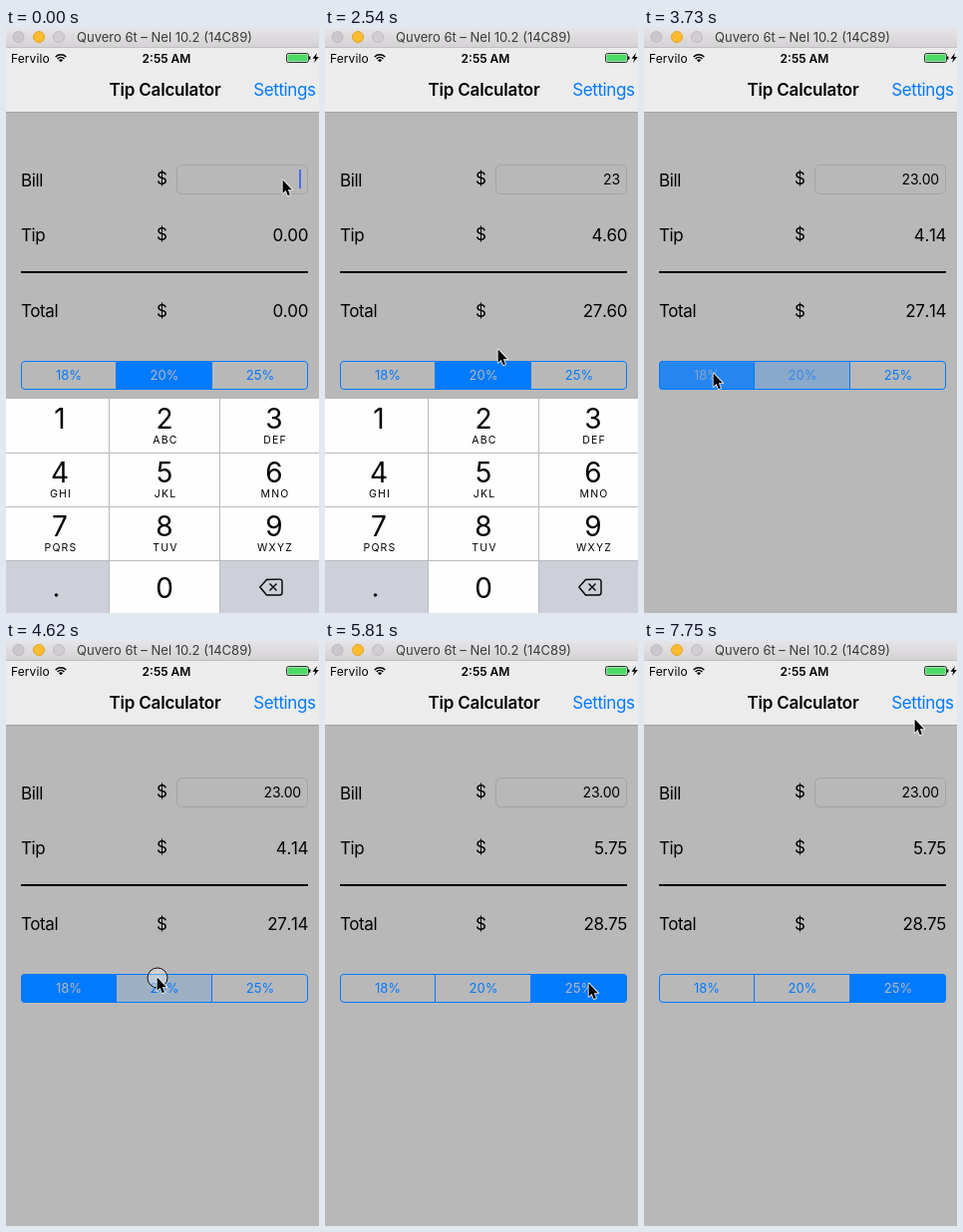
Recreate the animation shown at these times as an HTML page with a canvas. Size 314 by 587 pixels, loop 8 s.

```html
<!DOCTYPE html>
<html lang="en">
<head>
<meta charset="utf-8">
<title>Tip Calculator</title>
<style>
  html, body { margin: 0; width: 100%; height: 100%; overflow: hidden; background: #b8b8b8; }
  canvas { display: block; width: 314px; height: 587px; }
</style>
</head>
<body>
<canvas id="stage"></canvas>
<script>
const W = 314, H = 587, LOOP = 8000;
const BLUE = '#007aff', BG = '#b8b8b8', BAR = '#ececec';
const FAMILY = 'Inter, Roboto, "Liberation Sans", sans-serif';
const canvas = document.getElementById('stage');
const ctx = canvas.getContext('2d');
const ratio = window.devicePixelRatio || 1;
canvas.width = W * ratio;
canvas.height = H * ratio;

// The screen refreshes in even steps after a first pause.
const FIRST = 590, STEP = 149;
const stepAt = t => Math.floor((t - FIRST) / STEP);

// Pointer path: [step, x, y]
const PATH = [
  [-1, 277, 152], [6, 277, 152], [8, 262, 178], [10, 226, 232], [12, 197, 270],
  [13, 173, 322], [14, 131, 376], [16, 96, 368], [18, 74, 350], [20, 69, 346],
  [22, 69, 346], [24, 98, 365], [26, 142, 345], [27, 151, 337], [29, 151, 337],
  [31, 205, 342], [33, 262, 343], [36, 265, 343], [37, 273, 300], [38, 286, 200],
  [39, 287, 115], [40, 270, 70], [41, 263, 64], [45, 263, 64], [48, 271, 78]
];
// Taps on the rate buttons: [step of press, index]
const TAPS = [[20, 0], [27, 1], [33, 2]];
const RATES = [18, 20, 25];
const SEG_X = [15, 110.5, 206.5, 303];

function pointerAt(n) {
  const i = PATH.findIndex(p => p[0] >= n);
  if (i < 0) return PATH[PATH.length - 1].slice(1);
  if (i === 0) return PATH[0].slice(1);
  const [n0, x0, y0] = PATH[i - 1], [n1, x1, y1] = PATH[i];
  const k = (n - n0) / (n1 - n0);
  return [x0 + (x1 - x0) * k, y0 + (y1 - y0) * k];
}

function text(str, x, y, size, opt = {}) {
  ctx.font = `${opt.weight || 400} ${size}px ${FAMILY}`;
  ctx.letterSpacing = (opt.space || 0) + 'px';
  ctx.fontKerning = opt.kerning || 'auto';
  ctx.textAlign = opt.align || 'left';
  ctx.fillStyle = opt.color || '#000';
  ctx.fillText(str, x, y);
}

function rect(x, y, w, h, color) {
  ctx.fillStyle = color;
  ctx.fillRect(x, y, w, h);
}

function roundRect(x, y, w, h, r) {
  ctx.beginPath();
  ctx.roundRect(x, y, w, h, r);
}

function poly(points) {
  ctx.beginPath();
  points.forEach(([x, y]) => ctx.lineTo(x, y));
  ctx.closePath();
}

function disc(x, y, r, fill, stroke) {
  ctx.beginPath();
  ctx.arc(x, y, r, 0, Math.PI * 2);
  ctx.fillStyle = fill;
  ctx.fill();
  ctx.strokeStyle = stroke;
  ctx.lineWidth = 1;
  ctx.stroke();
}

function drawWindowBar() {
  const g = ctx.createLinearGradient(0, 0, 0, 20);
  g.addColorStop(0, '#e6e4e6');
  g.addColorStop(1, '#d3d1d3');
  rect(0, 0, W, 20, g);
  rect(0, 19, W, 1, '#c2c0c2');
  disc(12.5, 9, 5.5, '#cac8ca', '#bbb9bb');
  disc(33, 9, 5.5, '#fdbb2e', '#e3a42a');
  disc(53, 9, 5.5, '#d0ced0', '#bfbdbf');
  text('Quvero 6t – Nel 10.2 (14C89)', 71, 14, 13, { color: '#3a3a3a' });
}

function drawStatus() {
  rect(0, 20, W, 64, BAR);
  rect(0, 84, W, 1, '#a0a0a0');
  text('Fervilo', 5, 34.5, 12, { space: 0.1 });
  text('2:55 AM', 161, 34.5, 12, { weight: 600, align: 'center' });

  const a0 = -Math.PI * 0.75, a1 = -Math.PI * 0.25;
  ctx.strokeStyle = '#000';
  ctx.lineWidth = 1.5;
  for (const r of [4.8, 7.5]) {
    ctx.beginPath();
    ctx.arc(55, 34.3, r, a0, a1);
    ctx.stroke();
  }
  ctx.beginPath();
  ctx.moveTo(55, 34.3);
  ctx.arc(55, 34.3, 2.9, a0, a1);
  ctx.fillStyle = '#000';
  ctx.fill();

  roundRect(281.5, 25.5, 22, 9, 2);
  ctx.lineWidth = 0.8;
  ctx.stroke();
  roundRect(282.5, 26.5, 20, 7, 1);
  ctx.fillStyle = '#4cd964';
  ctx.fill();
  rect(304, 28.5, 1.4, 3, '#000');
  poly([[312, 25], [307.5, 30.8], [310.3, 30.8], [309, 35], [313.8, 29], [311, 29]]);
  ctx.fillStyle = '#000';
  ctx.fill();

  text('Tip Calculator', 159.5, 68, 17, { weight: 600, align: 'center', space: -0.2 });
  text('Settings', 310.5, 68, 17, { color: BLUE, align: 'right', space: -0.4 });
}

function drawForm(bill, tip, total, caret) {
  const tight = { space: -0.4 };
  const value = { space: -0.4, align: 'right', kerning: 'none' };
  text('Bill', 15, 158.5, 17, tight);
  text('Tip', 15, 214, 17, tight);
  text('Total', 15, 289.5, 17, tight);
  [157, 213, 289.5].forEach(y => text('$', 151, y, 17));
  roundRect(171.5, 137.5, 131, 29, 5);
  ctx.strokeStyle = '#a3a3a3';
  ctx.lineWidth = 1;
  ctx.stroke();
  text(bill, 296, 157, 14, { align: 'right', space: -0.15 });
  if (caret) rect(294, 142, 2, 19, '#476cec');
  text(tip.toFixed(2), 303, 214, 17, value);
  text(total.toFixed(2), 303, 289.5, 17, value);
  rect(15, 244, 288, 2, '#000');
}

// fills: opacity of each button's blue; chosen: the selected index
function drawSegments(fills, chosen, fading) {
  ctx.save();
  roundRect(15, 334, 288, 29, 4);
  ctx.clip();
  fills.forEach((a, i) => {
    ctx.globalAlpha = a;
    rect(SEG_X[i], 334, SEG_X[i + 1] - SEG_X[i], 29, BLUE);
  });
  ctx.restore();
  roundRect(15.5, 334.5, 287, 28, 3.5);
  ctx.strokeStyle = BLUE;
  ctx.lineWidth = 1;
  ctx.stroke();
  rect(110, 334, 1, 29, BLUE);
  rect(206, 334, 1, 29, BLUE);
  RATES.forEach((r, i) => {
    const color = i === chosen ? BG : BLUE;
    ctx.globalAlpha = fading && fills[i] ? 0.65 : 1;
    text(r + '%', [63, 159, 255][i], 353, 13, { align: 'center', color });
  });
  ctx.globalAlpha = 1;
}

function drawKeyboard(dy) {
  if (dy >= 215) return;
  const cols = [54, 159, 269];
  const letters = ['', 'ABC', 'DEF', 'GHI', 'JKL', 'MNO', 'PQRS', 'TUV', 'WXYZ'];
  ctx.save();
  ctx.translate(0, 372 + dy);
  rect(0, 0, W, 216, '#fefefe');
  rect(0, 162, 103, 54, '#cdd0d8');
  rect(215, 162, 99, 54, '#cdd0d8');
  [54, 108, 162].forEach(y => rect(0, y, W, 1, '#b9bbc0'));
  [103, 214].forEach(x => rect(x, 0, 1, 216, '#b9bbc0'));
  letters.forEach((s, i) => {
    const x = cols[i % 3], y = 54 * Math.floor(i / 3);
    text(i + 1, x, y + 30, 28, { align: 'center' });
    text(s, x + 1, y + 45, 10.5, { align: 'center', space: 1.2 });
  });
  text('0', 159, 199.5, 28, { align: 'center' });
  disc(50.5, 197, 1.3, '#000', '#000');

  ctx.strokeStyle = '#000';
  ctx.lineWidth = 1.4;
  ctx.lineJoin = 'round';
  ctx.beginPath();
  ctx.moveTo(254.8, 189);
  ctx.lineTo(261.5, 181.5);
  ctx.arcTo(277, 181, 277, 197, 2.5);
  ctx.arcTo(277, 197, 262, 197, 2.5);
  ctx.lineTo(261.5, 197);
  ctx.closePath();
  ctx.moveTo(264.5, 185.5);
  ctx.lineTo(271.5, 192.5);
  ctx.moveTo(271.5, 185.5);
  ctx.lineTo(264.5, 192.5);
  ctx.stroke();
  ctx.restore();
}

function drawPointer(x, y, pressed) {
  ctx.save();
  ctx.translate(x, y);
  if (pressed) disc(1, 1, 10, 'rgba(255,255,255,.35)', '#111');
  ctx.translate(0.6, 0.6);
  ctx.scale(0.92, 0.92);
  poly([[0, 0], [0, 14.5], [3.3, 11.4], [5.6, 17], [8, 16], [5.7, 10.6], [10.2, 10.4]]);
  ctx.lineJoin = 'round';
  ctx.lineWidth = 1.8;
  ctx.strokeStyle = '#fff';
  ctx.stroke();
  ctx.fillStyle = '#000';
  ctx.fill();
  ctx.restore();
}

function draw(t) {
  const n = stepAt(t);
  const typed = n < 3 ? '' : n < 6 ? '2' : '23';
  const bill = n < 14 ? typed : '23.00';
  const caret = n < 0 || (n >= 3 && n < 10);

  let chosen = 1, fills = [0, 1, 0], pressed = false, fading = false;
  for (const [at, i] of TAPS) {
    if (n === at) {
      pressed = true;
      fills[i] = 0.15;
    } else if (n > at) {
      fading = n === at + 1;
      fills = [0, 0, 0];
      if (fading) fills[chosen] = 0.25;
      fills[i] = fading ? 0.8 : 1;
      chosen = i;
    }
  }
  const amount = Number(typed), tip = amount * RATES[chosen] / 100;

  ctx.setTransform(ratio, 0, 0, ratio, 0, 0);
  rect(0, 0, W, H, BG);
  drawForm(bill, tip, amount + tip, caret);
  drawSegments(fills, chosen, fading);
  drawKeyboard(n < 14 ? 0 : n === 14 ? 214 : 215);
  drawStatus();
  drawWindowBar();
  drawPointer(...pointerAt(n), pressed);
}

const start = performance.now();
function tick() {
  draw((performance.now() - start) % LOOP);
  requestAnimationFrame(tick);
}
tick();
</script>
</body>
</html>
```
